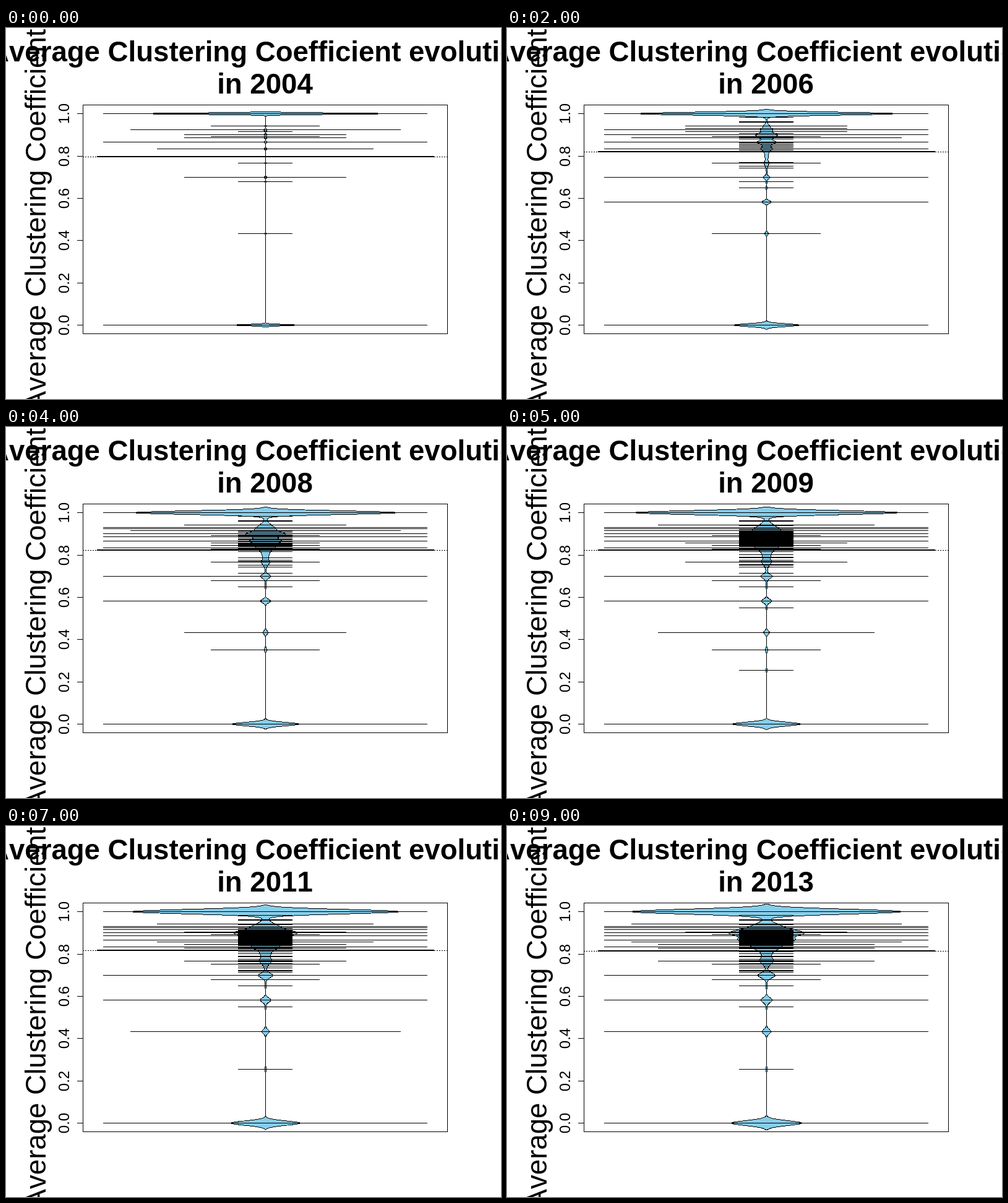
Recreate the animation shown at these times as an HTML page. Size 800x600 px, loop 10000 ms.

```html
<!DOCTYPE html>
<html lang="en">
<head>
<meta charset="utf-8">
<title>Clustering coefficient beans</title>
<style>
  html, body { margin: 0; width: 100%; height: 100%; overflow: hidden; background: #fff; }
  svg { display: block; width: 800px; height: 600px; }
  text { font: 45.6px "Liberation Sans", Arial, sans-serif; font-kerning: none; white-space: pre; }
  .title { font-weight: 700; }
  .middle { text-anchor: middle; }
  .tick { font-size: 24px; text-anchor: middle; }
  path { fill: none; stroke: #000; shape-rendering: crispEdges; }
  rect { shape-rendering: crispEdges; }
  .bean { fill: #87ceeb; stroke-linejoin: round; }
  .dotted { stroke-dasharray: 2 2; }
</style>
</head>
<body>
<svg id="stage" viewBox="0 0 800 600"></svg>
<script>
const YEARS = 10, LAST = YEARS - 1, FIRST_YEAR = 2004, STEP = 1000;
const TOP = 138, BOTTOM = 480, CENTRE = 419.5;
const UNIT = 43.65, MAX_COUNT = 6;

// Repeated values: row, first count, yearly growth, bump half width at start and end, years present.
const clusters = [
  [TOP, 6, 0, 206, 217],
  [158, 2, .3, 1, 6],
  [162, 0, 1.7],
  [164, 5, .4, 3, 12],
  [167, 1, 1, 1, 4],
  [171, 3, 0, 1, 1, 6],
  [172, 3, 3, 2, 38],
  [175, 2, 0],
  [177, 3, .9, 2, 12],
  [184, 6, 0, 3, 28],
  [187, 0, .6],
  [191, 0, .4],
  [195, 4, 1, 2, 10],
  [197, 0, .4],
  [218, 1, .3, 1, 6],
  [223, 0, .25],
  [241, 3, 3, 2, 13],
  [248, 1, .15],
  [258, .4, .1],
  [281, 0, 6, 7, 9],
  [292, 0, .1],
  [332, 1, .5, 1, 7],
  [360, 2, 0, 2, 2, 3, 5],
  [393, 0, .1],
  [BOTTOM, 6, 0, 52, 57]
];

// Year and row from which the mean holds.
const meanKeys = [[0, 208], [1, 207], [2, 200], [4, 199], [6, 201], [8, 202]];
const meanRow = year => meanKeys.filter(([from]) => from <= year).pop()[1];

const noise = n => { const s = Math.sin(n * 12.9898) * 43758.5453; return s - Math.floor(s); };
const bell = (d, spread) => Math.exp(-((d / spread) ** 2));
const crowd = year => Math.min(1, year / 6);
const reach = year => 3.5 + 8.5 * (year / LAST) ** .6;

function clustersIn(year) {
  const grown = (year / LAST) ** .8;
  return clusters.map(([row, start, growth, w0 = 1, w1 = 1, from = 0, to = LAST]) => ({
    row,
    count: year < from || year > to ? 0 : Math.min(MAX_COUNT, Math.round(start + growth * year)),
    width: w0 + (w1 - w0) * grown
  })).filter(c => c.count > 0);
}

function beanPath(year) {
  const spread = reach(year) / 3 * Math.SQRT2;
  const parts = clustersIn(year);
  const left = [], right = [];
  for (let y = TOP + .5 - reach(year); y <= BOTTOM + .5 + reach(year); y += .7) {
    const half = parts.reduce((sum, c) => sum + c.width * bell(y - c.row - .5, spread),
      14 * crowd(year) * bell(y - 185, 32));
    left.push(`${(CENTRE - half).toFixed(1)} ${y.toFixed(1)}`);
    right.unshift(`${(CENTRE + half).toFixed(1)} ${y.toFixed(1)}`);
  }
  return `M${left.concat(right).join('L')}Z`;
}

function line(row, count) {
  const half = UNIT * count + .33;
  return `M${419.1 - half} ${row + .5}h${2 * half}`;
}

// Single values crowd in around row 180 and stay once they have appeared.
function singles(year) {
  let d = '';
  for (let row = 143; row <= 236; row++) {
    const share = .4 + .8 * Math.exp(-(((row - 180) / 14) ** 4));
    if (noise(row) < crowd(year) * share) d += line(row, 1);
  }
  return d;
}

function yearGroup(year) {
  const mean = meanRow(year);
  const repeated = clustersIn(year).map(c => line(c.row, c.count)).join('');
  return `<g class="year" display="none">
    <text class="title middle" x="418.5" y="106">in ${FIRST_YEAR + year}</text>
    <path class="dotted" d="M124 ${mean + .5}H713"/>
    <path class="bean" d="${beanPath(year)}"/>
    <path d="${repeated}${singles(year)}"/>
    <rect x="147" y="${mean - 1}" width="545" height="2"/>
  </g>`;
}

function axis() {
  let out = '';
  for (let i = 0; i <= 5; i++) {
    const y = Math.round(480.2 - 68.4 * i) + .5;
    out += `<path d="M115 ${y}H124"/>
      <text class="tick" transform="translate(102 ${y}) rotate(-90)">${(i / 5).toFixed(1)}</text>`;
  }
  return out;
}

const stage = document.getElementById('stage');
stage.innerHTML = `
  <text class="title" x="-28" y="54">Average Clustering Coefficient evolution</text>
  <text class="middle" transform="translate(64 309.5) rotate(-90)">Average Clustering Coefficient</text>
  ${axis()}
  ${Array.from({ length: YEARS }, (_, year) => yearGroup(year)).join('')}
  <path d="M124.5 124.5H713.5V494.5H124.5Z"/>`;

const groups = [...stage.querySelectorAll('.year')];
const start = performance.now();
let shown = -1;

function tick() {
  const year = Math.floor(Math.max(0, performance.now() - start) / STEP) % YEARS;
  if (year !== shown) {
    groups.forEach((g, i) => g.setAttribute('display', i === year ? 'inline' : 'none'));
    shown = year;
  }
  requestAnimationFrame(tick);
}
tick();
</script>
</body>
</html>
```
